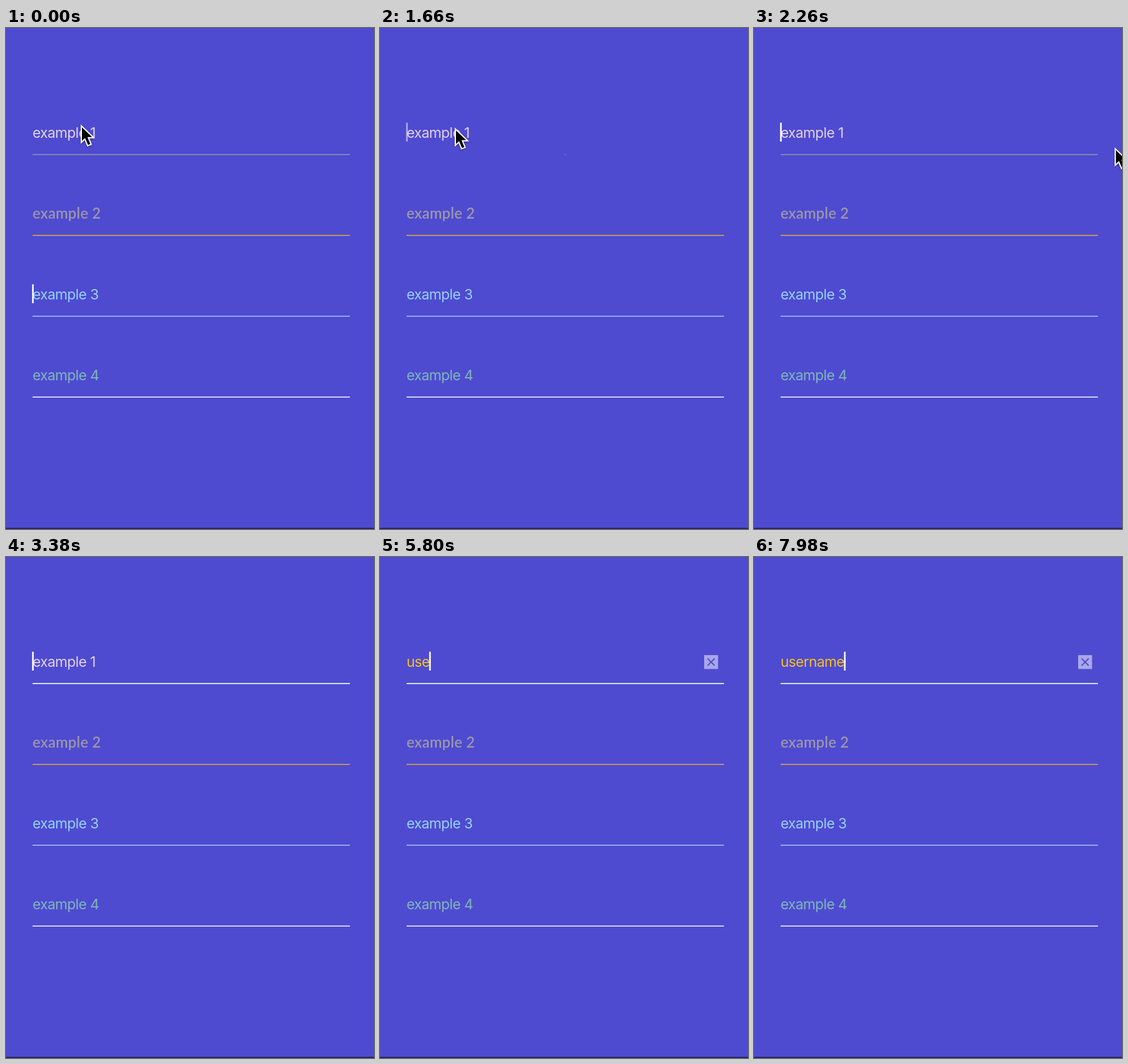
Recreate the animation shown at these times as an HTML page with a canvas. Size 596 px wide and 812 px high, loop 8 s.

```html
<!DOCTYPE html>
<html lang="en">
<head>
<meta charset="utf-8">
<title>Text fields</title>
<style>
  html, body { margin: 0; width: 100%; height: 100%; overflow: hidden; background: #4e4bd0; }
  canvas { display: block; }
</style>
</head>
<body>
<canvas id="stage" width="596" height="812"></canvas>
<script>
const ctx = document.getElementById('stage').getContext('2d');
const LOOP = 8000, BACKGROUND = '#4e4bd0';
const LEFT = 43, RIGHT = 557, ROW_GAP = 131;
const PLAIN = { font: '23px Inter, sans-serif', spacing: '-0.6px' };
const GEOMETRIC = { font: '600 24px Lato, sans-serif', spacing: '0.2px' };

const fields = [
  { label: 'example 1', color: '#e3d3e8', line: '#9190a9', type: PLAIN },
  { label: 'example 2', color: '#9c97a8', line: '#dba540', type: GEOMETRIC },
  { label: 'example 3', color: '#98d1f6', line: '#98c1ee', type: PLAIN },
  { label: 'example 4', color: '#7fb8b8', line: '#eeeef4', type: PLAIN },
];

// The third field holds the focus until the first one takes it.
const EARLIER_FOCUS = -1200, FOCUS = 1090, SQUEEZE = 1184, FADE = 600;
const WORD = 'username';
const keyTimes = [4700, 5180, 5660, 6100, 6500, 6880, 7260, 7640];

const pointerPath = [
  [0, 122, 157], [400, 122, 162], [1660, 122, 162], [1940, 211, 160.5],
  [2260, 584, 194], [2320, 650, 200],
];
const arrow = [[0, 4], [0, 26], [5, 21.3], [9.8, 32.5], [13.6, 30.9], [8.9, 19.8], [16.5, 19.8]];

const ramp = (t, start, length) => Math.min(1, Math.max(0, (t - start) / length));
const ease = s => (1 - Math.cos(Math.PI * s)) / 2;

function setType({ font, spacing }) {
  ctx.font = font;
  ctx.letterSpacing = spacing;
}

function drawText(text, row, color, type) {
  setType(type);
  ctx.fillStyle = color;
  ctx.fillText(text, LEFT, 178 + row * ROW_GAP);
}

function drawLine(row, color, scale, whiteness) {
  const half = (RIGHT - LEFT) / 2 * scale;
  const box = [(LEFT + RIGHT) / 2 - half, 204.4 + row * ROW_GAP, half * 2, 1.6];
  ctx.fillStyle = color;
  ctx.fillRect(...box);
  ctx.fillStyle = `rgba(248, 248, 252, ${whiteness})`;
  ctx.fillRect(...box);
}

function drawCaret(x, row, sinceReset) {
  const phase = sinceReset % 1000;
  const opacity = 1 - ramp(phase, 500, 150) + ramp(phase, 700, 150);
  ctx.fillStyle = `rgba(255, 255, 255, ${opacity})`;
  ctx.fillRect(x, 153.5 + row * ROW_GAP, 2.6, 30.5);
}

function drawClearButton() {
  ctx.fillStyle = '#a9a7e9';
  ctx.fillRect(525, 159, 22.5, 22.5);
  ctx.strokeStyle = BACKGROUND;
  ctx.lineWidth = 1.8;
  ctx.beginPath();
  ctx.moveTo(530.5, 164.5);
  ctx.lineTo(542, 176);
  ctx.moveTo(542, 164.5);
  ctx.lineTo(530.5, 176);
  ctx.stroke();
}

function drawPointer(t) {
  const next = pointerPath.findIndex(point => point[0] > t);
  if (next < 0) return;
  const [start, x0, y0] = pointerPath[next - 1];
  const [end, x1, y1] = pointerPath[next];
  let s = ramp(t, start, end - start);
  if (start === 1660) s *= s;
  ctx.save();
  ctx.translate(x0 + (x1 - x0) * s + 1, y0 + (y1 - y0) * s);
  ctx.beginPath();
  arrow.forEach(point => ctx.lineTo(...point));
  ctx.closePath();
  ctx.shadowColor = 'rgba(0, 0, 0, .3)';
  ctx.shadowBlur = 3;
  ctx.shadowOffsetY = 1.5;
  ctx.strokeStyle = '#fff';
  ctx.lineWidth = 4;
  ctx.stroke();
  ctx.shadowColor = 'transparent';
  ctx.fillStyle = '#000';
  ctx.fill();
  ctx.restore();
}

function draw(t) {
  ctx.fillStyle = BACKGROUND;
  ctx.fillRect(0, 0, 596, 812);
  ctx.fillStyle = '#272569';
  ctx.fillRect(0, 810, 596, 2);

  const focused = t >= FOCUS;
  const typed = WORD.slice(0, keyTimes.filter(time => time <= t).length);
  const squeeze = ramp(t, FOCUS, SQUEEZE);
  const focusFade = start => ease(ramp(t, start + SQUEEZE, FADE));
  const whiteness = [
    focusFade(FOCUS), 0,
    focusFade(EARLIER_FOCUS) * (1 - ease(ramp(t, FOCUS, FADE))), 0,
  ];

  fields.forEach(({ label, color, line, type }, row) => {
    if (row === 0 && typed) drawText(typed, row, '#f4c220', type);
    else drawText(label, row, color, type);
    const scale = row === 0 ? (1 + Math.cos(2 * Math.PI * squeeze)) / 2 : 1;
    drawLine(row, line, scale, whiteness[row]);
  });

  if (typed) drawClearButton();
  if (focused) {
    setType(PLAIN);
    const lastKey = typed ? keyTimes[typed.length - 1] : FOCUS;
    drawCaret(LEFT - 0.7 + ctx.measureText(typed).width, 0, t - lastKey);
  } else {
    drawCaret(LEFT - 0.7, 2, t - EARLIER_FOCUS);
  }
  drawPointer(t);
}

const began = performance.now();
function tick() {
  draw((performance.now() - began) % LOOP);
  requestAnimationFrame(tick);
}
tick();
</script>
</body>
</html>
```
